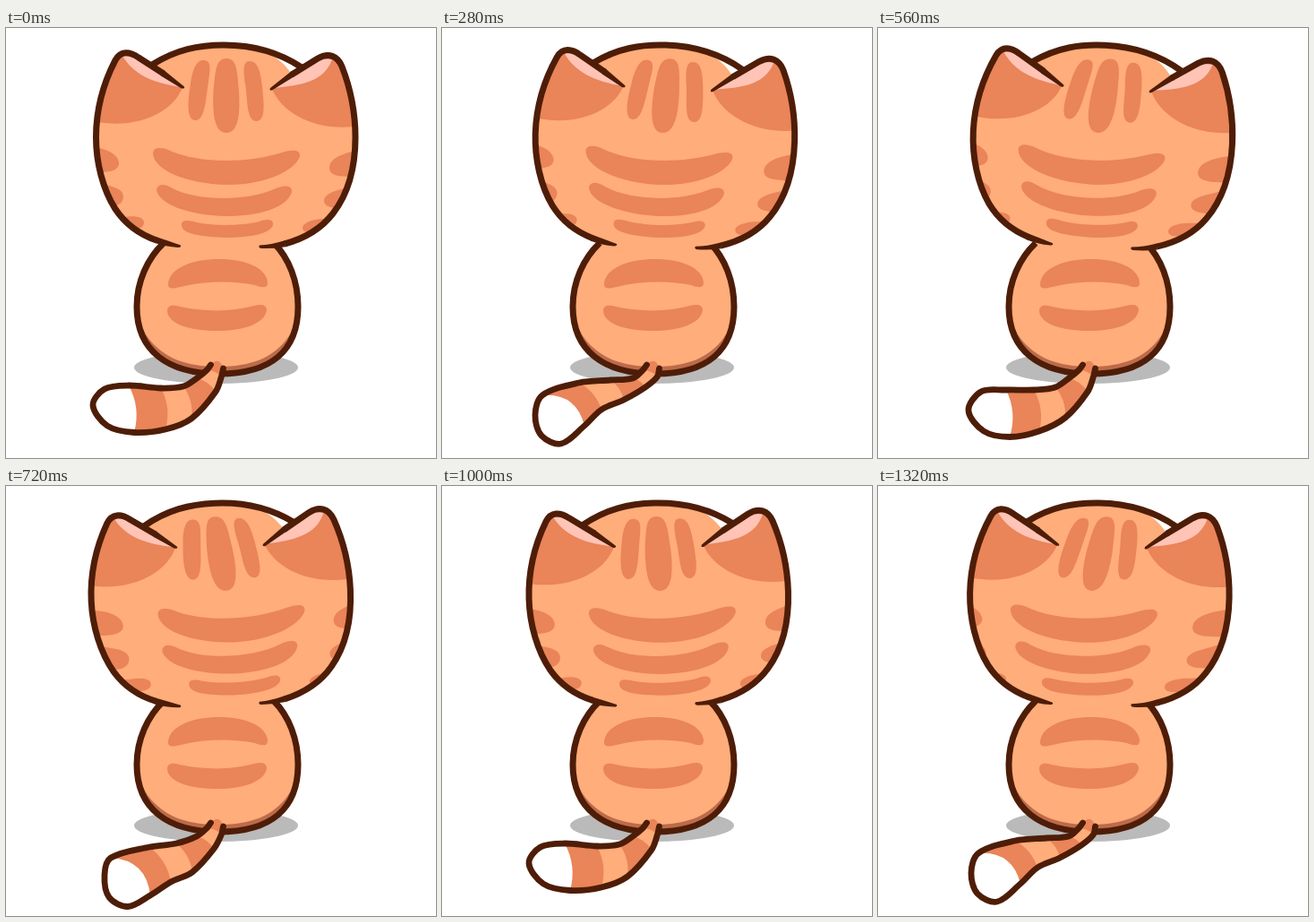
An HTML page that plays this animation: 480x480 px, repeating every 1400 ms.

```html
<!DOCTYPE html>
<html lang="en">
<head>
<meta charset="utf-8">
<title>Sitting cat</title>
<style>
  html, body { margin: 0; width: 100%; height: 100%; overflow: hidden; background: #fff; }
  svg { display: block; width: 100vw; height: 100vh; }
  .base { fill: #ffad7a; }
  .dark { fill: #ea8459; }
  .pink { fill: #ffc4b6; }
  .ink { fill: #4e1d08; }
  .line { fill: none; stroke: #4e1d08; stroke-width: 7; stroke-linejoin: round; }
</style>
</head>
<body>
<svg viewBox="0 0 480 480">
  <defs>
    <path id="skull" d="M176 51 L148 33 C138 26 128 25 122 36 C108 63 100.5 92 100.5 122 C100.5 150 108 180 122 202 C132 217 148 230 168 237 L193 244 L284 245 L311 241 C333 235 352 224 365 207 C382 185 390 155 390 122 C390 92 384 66 375 43 C370 31 360 27 348 34 L319 52 C303 26 275 19 243 19 C215 19 190 24 163 41z"/>
    <clipPath id="inHead"><use href="#skull"/></clipPath>
  </defs>

  <ellipse cx="234.5" cy="379" rx="91.5" ry="18" fill="#bababa"/>

  <g id="body">
    <path fill="#bd6b4a" d="M176 240 C158 257 146 283 146 311 C146 360 180 386 238 386 C296 386 326 360 326 311 C326 283 316 257 299 240z"/>
    <path class="base" d="M176 236 C158 257 146 283 146 311 C148 325 152 337 158 345 C175 368 200 378 237 378 C274 378 299 368 315 345 C322 335 326 325 326 311 C326 283 316 257 299 240z"/>
    <path class="dark" d="M181 286 C182 268 208 258 238 258 C268 258 291 268 292 284 C292 291 286 290 278 287 C255 282 222 282 195 289 C187 291 181 292 181 286z M180 316 C180 309 187 309 194 311 C222 317 252 317 277 310 C285 308 291 309 291 315 C289 330 265 338 236 338 C207 338 181 331 180 316z"/>
    <path class="line" d="M176 240 C158 257 146 283 146 311 C146 360 180 386 238 386 C296 386 326 360 326 311 C326 283 316 257 299 240"/>
  </g>

  <g id="tail"></g>

  <g id="head">
    <use href="#skull" class="base"/>
    <g clip-path="url(#inHead)">
      <path id="crown" class="dark" d="M246 34 C258 34 258 48 260 70 C262 100 258 117 246 117 C234 117 230 100 231.5 70 C234 48 234 34 246 34z M220 36 C230 36 228 46 226 60 C223 80 222 104 211 103 C201 102 203 80 206 62 C208 48 212 36 220 36z M272 37 C281 37 284 48 286 65 C288 85 290 103 280 104 C268 104 270 80 267 62 C265 48 264 37 272 37z"/>
      <path id="back1" class="dark" d="M164 140 C164 133 173 133 181 136 C215 152 270 151 308 139 C318 136 329 135 328 143 C325 156 295 175 247 175 C200 174 165 158 164 140z"/>
      <path id="back2" class="dark" d="M168 180 C170 173 178 174 186 179 C215 194 270 193 299 180 C310 175 320 175 319 183 C314 200 285 210 245 210 C203 209 169 196 168 180z"/>
      <path id="back3" class="dark" d="M196 220 C196 213 205 215 213 217 C232 221 262 221 283 216 C291 213 299 213 298 220 C295 229 275 234 245 234 C218 233 196 230 196 220z"/>
      <g id="cheeks" class="dark">
        <path d="M85 131 L104 134 C118 137 126 144 126 151 C126 159 116 161 104 161 L85 160z M90 170 L110 175 C122 177 131 181 131 188 C131 197 122 200 112 200 L90 200z M110 211 L132 211 C146 209 154 212 154 217 C154 223 148 225 140 225 L110 228z"/>
        <path d="M405 134 L386 138 C370 142 361 148 361 156 C361 165 372 166 388 166 L405 166z M400 172 L377 179 C362 183 355 187 355 193 C355 200 366 202 380 201 L400 203z M380 212 L353 213 C340 214 331 218 331 223 C331 229 340 229 350 228 L380 228z"/>
      </g>
    </g>
    <path class="dark" d="M197 66 C188 92 150 113 102 105 C104 80 112 56 122 36 C128 25 138 26 148 33z"/>
    <path class="dark" d="M297 68 C308 95 345 115 389 110 C387 85 382 62 375 43 C370 31 360 27 348 34z"/>
    <path class="pink" d="M197 66 C165 62 142 52 130 31 L148 33z"/>
    <path class="pink" d="M298 67 C330 64 355 60 364 35 L348 34z"/>
    <path class="line" d="M163 41 C190 24 215 19 243 19 C275 19 303 26 330 44"/>
    <path class="line" d="M176 51 L148 33 C138 26 128 25 122 36 C108 63 100.5 92 100.5 122 C100.5 150 108 180 122 202 C132 217 148 230 168 237"/>
    <path class="line" d="M319 52 L348 34 C360 27 370 31 375 43 C384 66 390 92 390 122 C390 155 382 185 365 207 C352 224 333 235 311 241"/>
    <path class="ink" d="M176.500 47.300 L199 65.500 Q200 68 196 67.500 L173 53.500z M318.500 48.300 L295 67 Q293.500 70 297 69.500 L322 54z"/>
    <path class="ink" d="M168 233.300 Q182 238 195 242.500 Q196 245 192 245 Q178 244 166 240z M311 237.300 Q296 242 283 242.500 Q281 245 285 246 Q298 246.500 312 244.200z"/>
  </g>
</svg>
<script>
const LOOP = 1400, SWISH = 520;
const $ = id => document.getElementById(id);
const lerp = (a, b, p) => a + (b - a) * p;
const smooth = p => p * p * (3 - 2 * p);

// Moments at which the drawing advances
const steps = [0, 40, 120, 200, 240, 280, 360, 440, 480, 560];
for (let t = 640; t <= 1160; t += 40) steps.push(t);
steps.push(1240, 1320);

// Head keys: [time, value]
const tilt = [[0, 0], [160, 0], [360, 2.7], [560, 2.7], [720, -2.6], [920, -2.6], [1160, 1]];
const turn = [[0, 0], [190, 0], [360, -11], [560, -11], [720, 9], [920, 9], [1160, -16]];

// Tail outlines from upper side round the tip to lower side; last value bends the tip marking
const up   = [198,400, 173,402, 137,399, 110,403, 97,421, 113,444, 143,451.5, 178,448, 207,436, 234,406, .2];
const fall = [198,401, 174,404, 143,404, 115,406, 101,427, 118,450, 147,456.5, 180,450, 209,435, 234,406, .2];
const down = [190,399, 160,403, 117,415, 110,434, 115,459, 136,469.5, 161,457, 184,442, 208,431, 232,405, .42];
const rise = [188,393, 153,396, 112,410, 104,432, 111,455, 133,464, 159,444, 178,426, 203,415, 227,401, .42];
const lift = [192,396, 158,398, 122,403, 104,418, 102,441, 124,455, 153,443, 178,435, 206,427, 232,406, .3];
const swish = [[0, up], [40, fall], [200, down], [280, rise], [360, lift], [480, up], [520, up]];

function span(keys, t) {
  let i = keys.length - 1;
  while (i && keys[i][0] > t) i--;
  const a = keys[i], b = keys[i + 1] || a;
  return [a[1], b[1], a === b ? 0 : (t - a[0]) / (b[0] - a[0])];
}
function ease(keys, t) {
  const [a, b, p] = span(keys, t);
  return lerp(a, b, smooth(p));
}

const tail = $("tail");
function tailPart(attrs) {
  const el = document.createElementNS("http://www.w3.org/2000/svg", "path");
  for (const k in attrs) el.setAttribute(k, attrs[k]);
  return tail.appendChild(el);
}
const tip = tailPart({ fill: "#fff" });
const bands = [5, 4, 3, 2, 1].map(n => [n, tailPart({ class: n % 2 ? "dark" : "base" })]);
const rim = tailPart({ class: "line", "stroke-linecap": "round", style: "stroke-width:6.800" });

function drawTail(t) {
  const [a, b, p] = span(swish, t % SWISH);
  const v = a.map((x, i) => lerp(x, b[i], p));
  const pts = [[228.5, 376], [224, 382], [213, 391]];
  for (let i = 0; i < 20; i += 2) pts.push([v[i], v[i + 1]]);
  pts.push([240.5, 389], [242.5, 380]);

  const last = pts.length - 1;
  const at = i => pts[Math.max(0, Math.min(last, i))];
  const curve = (from, to) => {
    let d = "";
    for (let i = from; i < to; i++) {
      const [o, q, r, s] = [at(i - 1), at(i), at(i + 1), at(i + 2)];
      // Tangents limited by chord length so uneven spacing stays smooth
      const len = (m, n) => Math.hypot(n[0] - m[0], n[1] - m[1]);
      const c = len(q, r);
      const k1 = c / (len(o, q) + c) / 1.5, k2 = c / (c + len(r, s)) / 1.5;
      d += `C${q[0] + (r[0] - o[0]) * k1 / 2} ${q[1] + (r[1] - o[1]) * k1 / 2} ` +
           `${r[0] - (s[0] - q[0]) * k2 / 2} ${r[1] - (s[1] - q[1]) * k2 / 2} ${r[0]} ${r[1]}`;
    }
    return d;
  };
  const start = `M${pts[0]}`, close = "Q238 366 228.500 376z";
  const all = start + curve(0, last);
  rim.setAttribute("d", all);
  tip.setAttribute("d", all + close);
  for (const [n, el] of bands) {
    const u = pts[n], l = pts[last - n], bend = n === 5 ? v[20] : .2;
    const dx = l[0] - u[0], dy = l[1] - u[1];
    const cx = (u[0] + l[0]) / 2 + dy * bend, cy = (u[1] + l[1]) / 2 - dx * bend;
    el.setAttribute("d", `${start}${curve(0, n)}Q${cx} ${cy} ${l}${curve(last - n, last)}${close}`);
  }
}

function move(id, x) { $(id).setAttribute("transform", `translate(${x} 0)`); }

function drawHead(t) {
  const yaw = ease(turn, t), slope = yaw * .0115;
  $("head").setAttribute("transform", `rotate(${ease(tilt, t)} 243 242)`);
  $("crown").setAttribute("transform", `matrix(1 0 ${slope} 1 ${-65 * slope} 0)`);
  move("back1", yaw * 1.12);
  move("back2", yaw);
  move("back3", yaw * (yaw < 0 ? .84 : 1.03));
  move("cheeks", yaw * (yaw < 0 ? .71 : .98));
}

function draw(ms) {
  const now = ms % LOOP;
  let t = 0;
  for (const s of steps) if (s <= now) t = s;
  drawTail(t);
  drawHead(t);
}

let begin;
function tick(ms) {
  if (begin === undefined) begin = ms;
  draw(ms - begin);
  requestAnimationFrame(tick);
}
draw(0);
requestAnimationFrame(tick);
</script>
</body>
</html>
```
